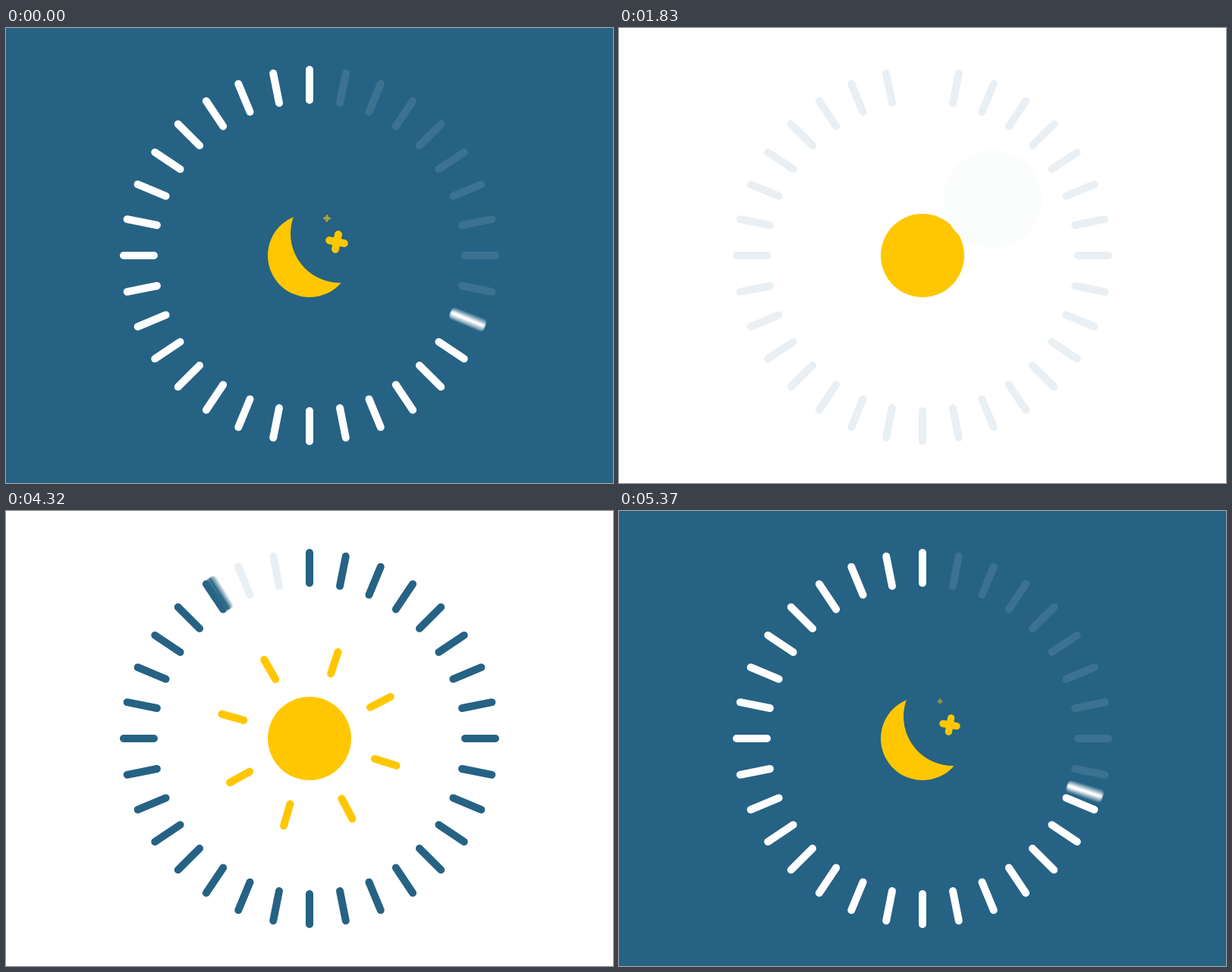
An HTML page with a canvas that plays this animation: 800x600 px, repeating every 5.4 s.

```html
<!DOCTYPE html>
<html lang="en">
<head>
<meta charset="utf-8">
<title>Night and day dial</title>
<style>
  html, body { margin: 0; width: 100%; height: 100%; overflow: hidden; background: #266284; }
  canvas { display: block; width: 800px; height: 600px; }
</style>
</head>
<body>
<canvas id="stage" width="800" height="600"></canvas>
<script>
const LOOP = 5400, HALF = 2700, STEP = 30;
const NAVY = [38, 98, 132], WHITE = [255, 255, 255], GOLD = '#ffc700';

const ctx = document.getElementById('stage').getContext('2d');
const blur = document.createElement('canvas');
blur.width = 800;
blur.height = 600;
const blurCtx = blur.getContext('2d');

const ramp = (n, start, length) => Math.min(1, Math.max(0, (n - start) / length));
const mix = (a, b, p) => `rgb(${a.map((v, i) => Math.round(v + (b[i] - v) * p))})`;

// Rounded bar on a spoke; degrees run clockwise from the top.
function bar(c, deg, inner, outer) {
  const a = deg * Math.PI / 180, s = Math.sin(a), k = -Math.cos(a);
  c.lineWidth = 10;
  c.lineCap = 'round';
  c.beginPath();
  c.moveTo(400 + s * inner, 300 + k * inner);
  c.lineTo(400 + s * outer, 300 + k * outer);
  c.stroke();
}

function disc(x, y, r, color) {
  ctx.fillStyle = color;
  ctx.beginPath();
  ctx.arc(x, y, r, 0, 2 * Math.PI);
  ctx.fill();
}

function drawHand(deg, color) {
  const copies = 15;
  blurCtx.clearRect(0, 0, 800, 600);
  blurCtx.globalCompositeOperation = 'lighter';
  blurCtx.globalAlpha = 1 / copies;
  blurCtx.strokeStyle = color;
  for (let i = 0; i < copies; i++) {
    bar(blurCtx, deg - 1 + 2 * i / (copies - 1), 205, 245);
  }
  ctx.drawImage(blur, 0, 0);
}

function drawRing(n, dark) {
  const night = n < HALF;
  const hand = n % HALF * 360 / HALF;
  const tint = n < 2670 ? ramp(n, 0, 300) : 1 - ramp(n, 2670, 120);
  const color = mix(NAVY, WHITE, tint);
  for (let i = 0; i < 32; i++) {
    const deg = i * 11.25;
    const filled = i === 0 || (deg > hand + 1) === night;
    ctx.strokeStyle = filled ? color : mix(NAVY, WHITE, dark);
    ctx.globalAlpha = filled ? 1 : 0.1;
    bar(ctx, deg, 205, 245);
  }
  ctx.globalAlpha = 1;
  drawHand(hand, color);
}

function drawSun(n, dark) {
  disc(400, 300, 55, GOLD);
  if (n > 2900) return;
  const leaving = n >= 2548;
  const away = leaving
    ? 1 - (1 - ramp(n, 2548, 300)) ** 2
    : (1 - ramp(n, 0, 300)) ** 3;
  const shade = leaving ? 1 - ramp(n, 2550, 122.5) : dark;
  disc(440 + 81 * away, 271 - 70 * away, 65, mix(WHITE, NAVY, shade));
}

function drawRays(n) {
  ctx.strokeStyle = GOLD;
  for (let k = 0; k < 8; k++) {
    const delay = 60 * k;
    const shown = n < HALF ? 1 - ramp(n, delay, 390) : ramp(n, HALF + delay, 390);
    if (!shown) continue;
    const age = (n < HALF ? n + HALF : n - HALF) - delay;
    const slide = 67 * (1 - shown) ** 2.3;
    ctx.globalAlpha = shown;
    bar(ctx, 45 * k + age * 20 / HALF, 90 - slide, 120 - slide);
  }
  ctx.globalAlpha = 1;
}

function drawStar(n, x, y, start) {
  const life = 1540, age = n - start;
  const edge = Math.min(age, life - age);
  if (edge <= 0) return;
  const size = Math.min(1, edge / 400);
  ctx.save();
  ctx.translate(x, y);
  ctx.rotate(age * 0.028 * Math.PI / 180);
  ctx.scale(size, size);
  ctx.globalAlpha = Math.min(1, edge / 200);
  ctx.strokeStyle = GOLD;
  ctx.lineWidth = 10;
  ctx.lineCap = 'round';
  ctx.beginPath();
  ctx.moveTo(0, -10);
  ctx.lineTo(0, 10);
  ctx.moveTo(-10, 0);
  ctx.lineTo(10, 0);
  ctx.stroke();
  ctx.restore();
}

function draw(time) {
  // n counts from nightfall; the loop opens 840 ms into the night.
  const n = (Math.floor(time / STEP) * STEP + 840) % LOOP;
  const dark = n < 2550 ? ramp(n, 0, 300) : 1 - ramp(n, 2550, 120);
  ctx.fillStyle = mix(WHITE, NAVY, dark);
  ctx.fillRect(0, 0, 800, 600);
  drawSun(n, dark);
  drawRing(n, dark);
  drawRays(n);
  drawStar(n, 436, 282, 440);
  drawStar(n, 423, 251, 710);
}

function tick() {
  draw(performance.now());
  requestAnimationFrame(tick);
}
draw(0);
requestAnimationFrame(tick);
</script>
</body>
</html>
```
